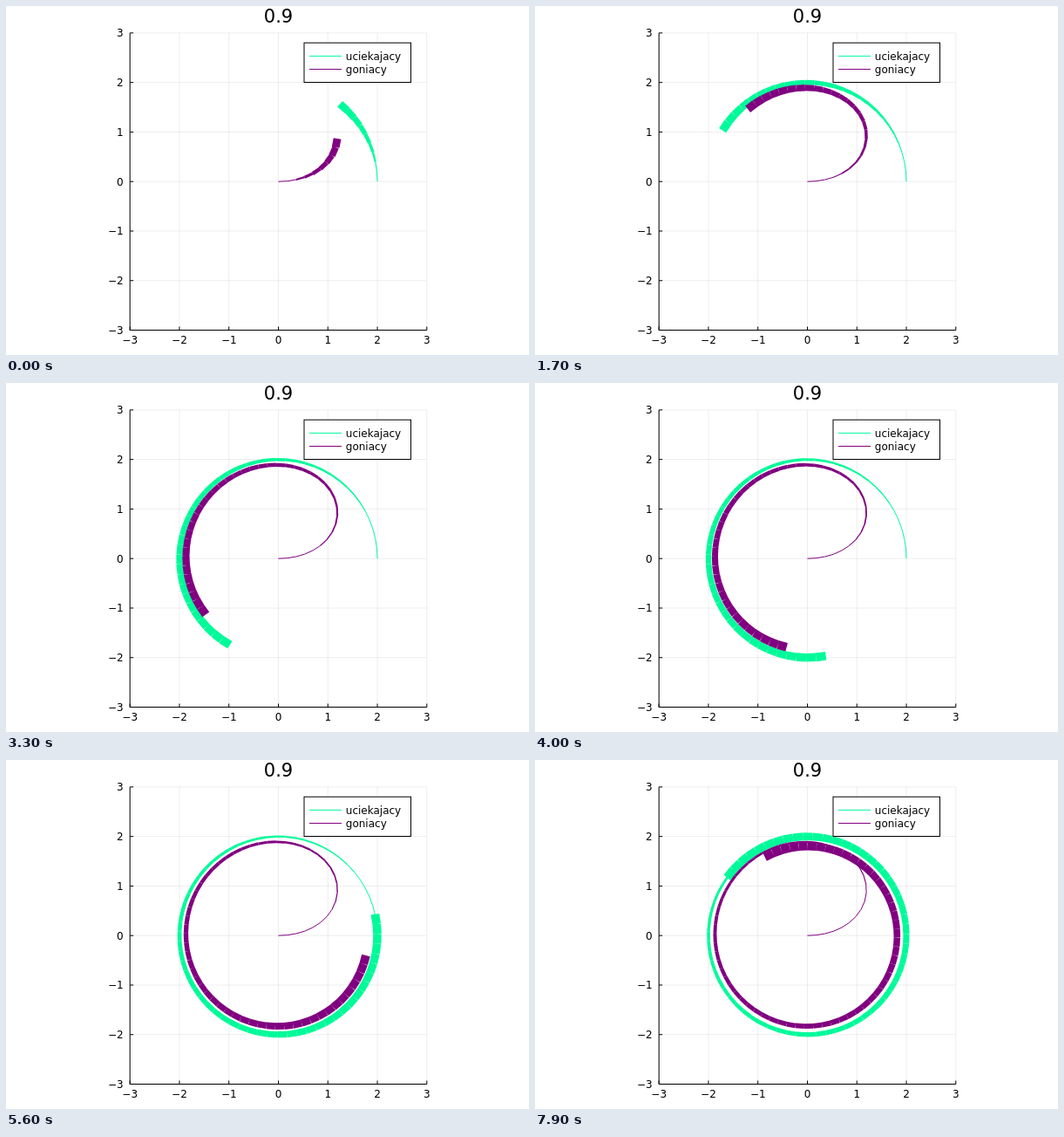
Animation, 600 px wide and 400 px high, one loop 8 s. Source, as an HTML page:

```html
<!DOCTYPE html>
<html lang="pl">
<head>
<meta charset="utf-8">
<title>Pursuit curve</title>
<style>
  html, body { margin: 0; width: 100%; height: 100%; overflow: hidden; background: #fff; }
  svg { display: block; width: 600px; height: 400px; }
  text { font: 12px "DejaVu Sans", sans-serif; fill: #000; }
  .title { font-size: 21px; }
</style>
</head>
<body>
<svg id="stage" viewBox="0 0 600 400"></svg>
<script>
const EVADER = '#00fa9a', PURSUER = '#800080';
const FRAME_MS = 100, FRAMES = 80, FIRST_POINTS = 10;
const DT = 0.1, RADIUS = 2, SPEED_RATIO = 0.9, MAX_WIDTH = 10;
const UNIT = 56.77, LEFT = 142.2, RIGHT = 482.8, TOP = 30.9, BOTTOM = 371.5;
const toX = x => 312.5 + x * UNIT;
const toY = y => 201.2 - y * UNIT;
const stage = document.getElementById('stage');

function add(tag, attrs, text) {
  const node = document.createElementNS('http://www.w3.org/2000/svg', tag);
  for (const name in attrs) node.setAttribute(name, attrs[name]);
  if (text !== undefined) node.textContent = text;
  stage.appendChild(node);
  return node;
}

function line(x1, y1, x2, y2, stroke = '#000', extra = {}) {
  return add('line', { x1, y1, x2, y2, stroke, ...extra });
}

function label(x, y, text, anchor = 'middle', cls = '') {
  add('text', { x, y, 'text-anchor': anchor, class: cls }, text);
}

function drawAxes() {
  const faint = { 'stroke-opacity': 0.07 };
  for (let v = -3; v <= 3; v++) {
    const x = toX(v), y = toY(v), name = String(v).replace('-', '\u2212');
    line(x, TOP, x, BOTTOM, '#000', faint);
    line(LEFT, y, RIGHT, y, '#000', faint);
    line(x, BOTTOM, x, BOTTOM - 4);
    line(LEFT, y, LEFT + 4, y);
    label(x, 387.3, name);
    label(134.7, y + 4.5, name, 'end');
  }
  line(LEFT, BOTTOM, RIGHT, BOTTOM);
  line(LEFT, TOP, LEFT, BOTTOM);
  label(312.5, 18.5, '0.9', 'middle', 'title');
}

function drawLegend() {
  add('rect', { x: 342, y: 42.2, width: 122.5, height: 45.3, fill: '#fff', stroke: '#000' });
  [['uciekajacy', EVADER], ['goniacy', PURSUER]].forEach(([name, color], i) => {
    const y = 57.4 + i * 15.1;
    line(348, y, 385, y, color);
    label(389.8, y + 4.4, name, 'start');
  });
}

const evaderAt = t => [RADIUS * Math.cos(t), RADIUS * Math.sin(t)];

// The pursuer always heads straight for the evader (midpoint integration).
function pursuitPath(count) {
  const substeps = 20, h = DT / substeps;
  const move = (from, aim, t, dt) => {
    const [ex, ey] = evaderAt(t);
    const dx = ex - aim[0], dy = ey - aim[1];
    const s = SPEED_RATIO * RADIUS * dt / Math.hypot(dx, dy);
    return [from[0] + dx * s, from[1] + dy * s];
  };
  const path = [[0, 0]];
  let p = path[0];
  for (let i = 1; i < count; i++) {
    for (let j = 0; j < substeps; j++) {
      const t = (i - 1) * DT + j * h;
      const mid = move(p, p, t, h / 2);
      p = move(p, mid, t + h / 2, h);
    }
    path.push(p);
  }
  return path;
}

function makeTrail(path, color) {
  return path.slice(1).map(([x, y], i) =>
    line(toX(path[i][0]), toY(path[i][1]), toX(x), toY(y), color));
}

function showTrail(segments, visible) {
  segments.forEach((segment, i) => {
    segment.setAttribute('visibility', i < visible ? 'visible' : 'hidden');
    segment.setAttribute('stroke-width', Math.max(1, MAX_WIDTH * i / visible));
  });
}

const pointCount = FIRST_POINTS + FRAMES - 1;
drawAxes();
const trails = [
  makeTrail(Array.from({ length: pointCount }, (_, i) => evaderAt(i * DT)), EVADER),
  makeTrail(pursuitPath(pointCount), PURSUER)
];
drawLegend();

let shown = -1;
function render(ms) {
  const step = Math.floor(ms / FRAME_MS) % FRAMES;
  if (step === shown) return;
  shown = step;
  trails.forEach(trail => showTrail(trail, FIRST_POINTS - 1 + step));
}

const start = performance.now();
function tick() {
  render(performance.now() - start);
  requestAnimationFrame(tick);
}
tick();
</script>
</body>
</html>
```
